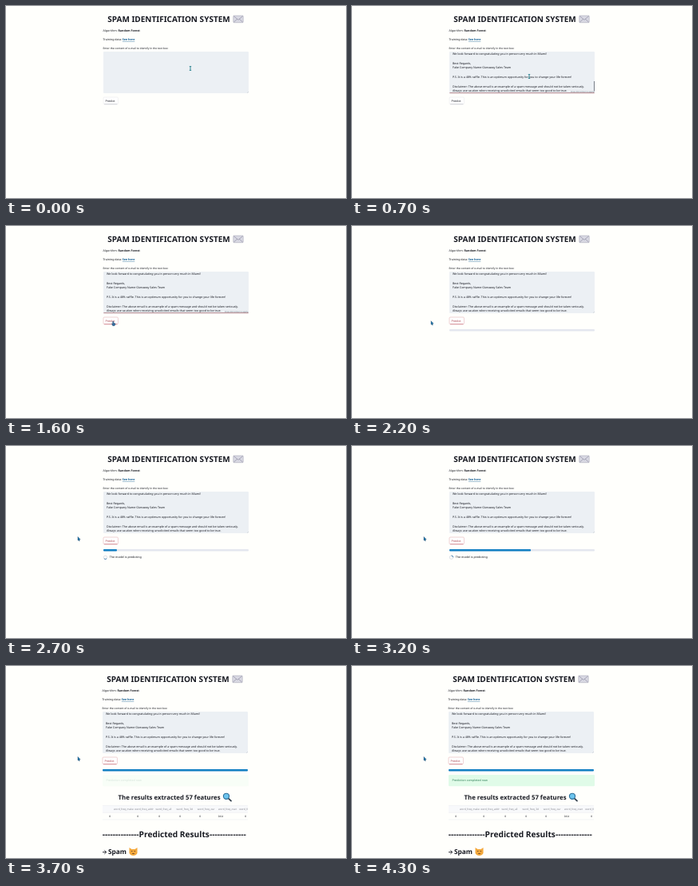
These frames come from a looping animation (426 px wide and 240 px high, 4400 ms). An HTML page:

```html
<!DOCTYPE html>
<html lang="en">
<head>
<meta charset="utf-8">
<title>Spam identification</title>
<style>
  html, body { margin: 0; width: 100%; height: 100%; overflow: hidden; background: #fffffc; }
  svg { display: block; width: 100vw; height: 100vh; }
  text { font: 3.63px "Noto Sans", sans-serif; fill: #181a22; text-rendering: geometricPrecision; white-space: pre; }
  .b { font-weight: 700; }
  .title { font-size: 10.03px; }
  .link { fill: #0d5a91; text-decoration: underline; }
  .hint { font-size: 2.5px; fill: #6d717b; text-anchor: end; }
  #table text { font-size: 3.2px; fill: #85878f; }
  #table .num { fill: #181a22; text-anchor: end; }
</style>
</head>
<body>
<svg viewBox="0 0 426 240">
  <defs>
    <clipPath id="boxClip"><rect x="122" y="57" width="182" height="51.6"/></clipPath>
    <clipPath id="tableClip"><rect x="122" y="174" width="182" height="19"/></clipPath>
  </defs>
  <g id="page">
    <text class="b title" x="127.2" y="20.4">SPAM IDENTIFICATION SYSTEM</text>
    <g stroke="#b3b3c1" stroke-width=".7">
      <rect x="284.8" y="12.1" width="12.4" height="8.6" rx=".8" fill="#d9d9e3"/>
      <path d="M285.3 20.2 290 16 M296.7 20.2 292 16 M285.3 12.6 291 17.4 296.7 12.6" fill="none" stroke="#9190a4"/>
    </g>
    <text x="121.5" y="32">Algorithm: <tspan class="b">Random Forest</tspan></text>
    <text x="121.5" y="43">Training data: <tspan class="b link">See here</tspan></text>
    <text x="121.5" y="53.5" style="font-size:3.3px">Enter the content of e-mail to identify in the text box:</text>

    <rect x="122" y="57" width="182" height="52" rx="1" fill="#ecf0f4"/>
    <path d="M302.5 108.5 303.7 107.3" stroke="#8a8d96" stroke-width=".4"/>
    <g id="mail" clip-path="url(#boxClip)"></g>
    <text id="hint" class="hint" x="303" y="107.7">Press Ctrl+Enter to apply</text>
    <path id="focus" d="M122.3 108.7H303.7" stroke="#a0656d" stroke-width=".8"/>
    <path id="thumb" d="M303.5 94V106.5" stroke="#6d727b" stroke-width=".9"/>

    <g id="button">
      <rect x="122" y="114" width="18.4" height="8.7" rx="1.2" fill="#fff" stroke-width=".5"/>
      <path d="M123 122.7H139.4" stroke-width=".6"/>
      <text x="124.6" y="119.6">Predict</text>
    </g>

    <rect id="track" x="122" y="128.9" width="182" height="2.5" rx="1" fill="#e4e7ef"/>
    <rect id="fill" x="122" y="128.9" height="2.5" rx="1" fill="#1380c3"/>
    <g id="spinner">
      <circle cx="124.5" cy="139.2" r="2.2" fill="none" stroke="#cfd3dc" stroke-width=".7"/>
      <path id="arc" d="M124.5 137A2.2 2.2 0 0 1 126.7 139.2" fill="none" stroke="#2a6fa8" stroke-width=".8"/>
      <text x="129.8" y="140.4">The model is predicting</text>
    </g>

    <g id="results">
      <g id="success">
        <rect x="122" y="136" width="183" height="14.3" rx="1.2" fill="#e0fbe8"/>
        <text x="126.5" y="144.3" style="fill:#2f7f57">Prediction completed now</text>
      </g>
      <text class="b" x="141.6" y="166.8" style="font-size:7.8px">The results extracted 57 features</text>
      <path d="M279.5 165.3 283 168.6" stroke="#34414d" stroke-width="1.8" stroke-linecap="round"/>
      <circle cx="277" cy="162.8" r="3.6" fill="#6cc4ee" stroke="#2d6f98" stroke-width="1.1"/>
      <g id="table" clip-path="url(#tableClip)">
        <rect x="122" y="174.3" width="182" height="9" fill="#f8f9fb"/>
        <path d="M122 174.3H304M122 183.3H304M122 192H304" stroke="#e6e8ed" stroke-width=".5"/>
      </g>
      <text class="b" x="121.7" y="214.4" style="font-size:10.2px">--------------Predicted Results--------------</text>
      <path d="M122 232.7H126.5M124.4 230.5 126.7 232.7 124.4 234.9" fill="none" stroke="#181a22" stroke-width=".9"/>
      <text class="b" x="129" y="235.4" style="font-size:8.3px">Spam</text>
      <path d="M155.5 227 158.5 229H162.5L165.5 227V234Q164 237 160.5 237T155.5 234Z" fill="#f3a83b"/>
      <path d="M158 231.5H159.3M161.7 231.5H163M159.2 234.5H161.8" stroke="#754b28" stroke-width="1"/>
    </g>
  </g>
  <g id="cursor">
    <path id="beam" d="M-1.2-2.4H1.2M0-2.4V2.4M-1.2 2.4H1.2" stroke="#247e8c" stroke-width=".9"/>
    <path id="hand" d="M-.8-2.7H.3V-.7L2.3-.2V1.5L1.4 2.7H-.8L-2-.1-.8.3Z" fill="#316da0" stroke="#203c5d" stroke-width=".4"/>
    <path id="arrow" d="M-1.3-2.5 1.8.7.4.9 1.1 2.3.2 2.7-.5 1.4-1.3 2Z" fill="#1875ad" stroke="#244563" stroke-width=".4"/>
  </g>
</svg>
<script>
const LOOP = 4400, STEP = 100;
const $ = id => document.getElementById(id);
const show = (id, on) => $(id).style.display = on ? "" : "none";
const clamp = v => Math.max(0, Math.min(1, v));

function addText(parent, x, y, content, cls = "") {
  const el = document.createElementNS("http://www.w3.org/2000/svg", "text");
  el.setAttribute("x", x);
  el.setAttribute("y", y);
  el.setAttribute("class", cls);
  el.textContent = content;
  $(parent).append(el);
}

[
  [60.5, "We look forward to congratulating you in person very much in Miami!"],
  [72.8, "Best Regards,"],
  [78.3, "Fake Company Name Giveaway Sales Team"],
  [90, "P.S. It is a 48% raffle. This is an optimum opportunity for you to change your life forever!"],
  [101.5, "Disclaimer: The above email is an example of a spam message and should not be taken seriously."],
  [107.1, "Always use caution when receiving unsolicited emails that seem too good to be true."]
].forEach(([y, line]) => addText("mail", 126, y, line));

["make", "addr", "all", "3d", "our", "over", "remo"].forEach((word, i) =>
  addText("table", 136 + i * 26.2, 180, "word_freq_" + word));
[132, 167, 194, 220, 245, 273, 302].forEach((x, i) =>
  addText("table", x, 189.2, i === 5 ? "0.64" : "0", "num"));

// time, x, y
const route = [
  [0, 231, 78], [100, 231, 78], [600, 222, 88], [700, 222, 88], [1200, 140, 119.5],
  [1600, 134.5, 122], [2000, 134.5, 122], [2200, 100.3, 121.2], [2500, 91.3, 116], [LOOP, 91.3, 116]
];

function cursorAt(t) {
  const i = route.findIndex(p => p[0] > t);
  const [t0, x0, y0] = route[i - 1], [t1, x1, y1] = route[i];
  const k = (t - t0) / (t1 - t0);
  return [x0 + (x1 - x0) * k, y0 + (y1 - y0) * k];
}

function render(t) {
  const done = t >= 3700, hot = t >= 1200, pasted = t >= 400;
  $("page").setAttribute("transform", `translate(${done ? -1 : 0} 0)`);
  show("mail", pasted);
  show("hint", pasted && t < 2000);
  show("focus", t >= 200 && t < 2000);
  show("thumb", pasted && t < 1200);

  const [box, edge, label] = $("button").children;
  box.setAttribute("stroke", hot ? "#dfa5aa" : "#e4e5e8");
  edge.setAttribute("stroke", hot ? "#c2626c" : "#b9bbc1");
  label.style.fill = hot ? "#a8404d" : "";

  show("track", t >= 2100);
  $("fill").setAttribute("width", 182 * clamp((t - 2600) / 1070));
  show("spinner", t >= 2600 && !done);
  $("arc").setAttribute("transform", `rotate(${t * .45} 124.5 139.2)`);
  show("results", done);
  $("success").setAttribute("opacity", clamp(.2 + (t - 3700) / 375));

  $("cursor").setAttribute("transform", `translate(${cursorAt(t)})`);
  show("beam", t < 1100);
  show("hand", t >= 1100 && t < 2100);
  show("arrow", t >= 2100);
}

function tick() {
  render(Math.floor(performance.now() % LOOP / STEP) * STEP);
  requestAnimationFrame(tick);
}
tick();
</script>
</body>
</html>
```
